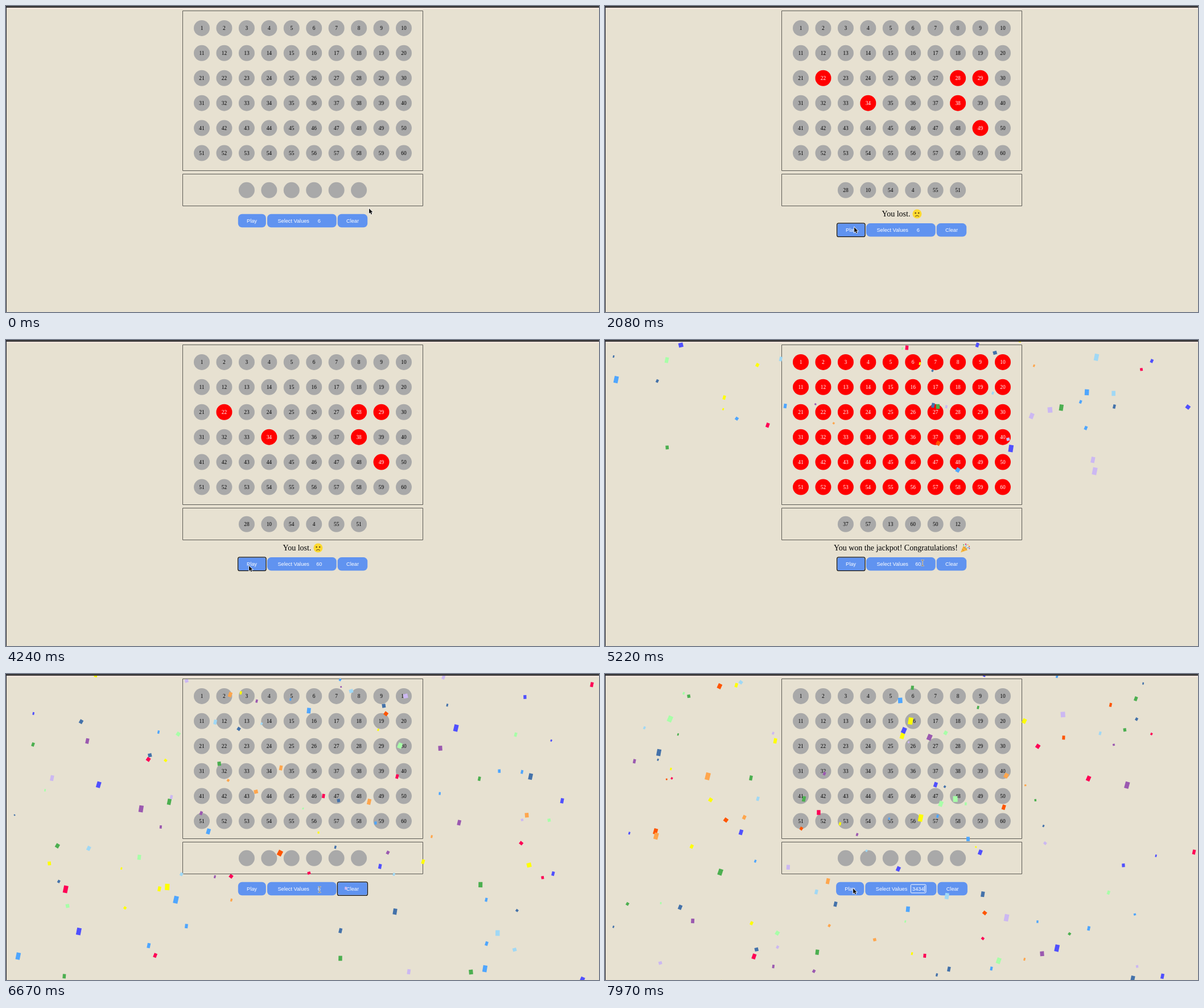
These frames come from a looping animation (1042 px wide and 538 px high, 8000 ms). An HTML page with a canvas:

```html
<!DOCTYPE html>
<html lang="en">
<head>
<meta charset="utf-8">
<title>Lottery</title>
<style>
  html, body { margin: 0; height: 100%; overflow: hidden; background: #e7e1d1; }
  canvas { display: block; }
</style>
</head>
<body>
<canvas id="stage" width="1042" height="538"></canvas>
<script>
const ctx = document.getElementById('stage').getContext('2d');
const LOOP = 8000, BLUE = '#6093f0';
const SERIF = '"Liberation Serif", serif', SANS = '"Liberation Sans", sans-serif';
const WON = 'You won the jackpot! Congratulations!';

let seed = 11;
const random = () => (seed = (seed * 16807) % 2147483647) / 2147483647;
const between = (low, high) => low + random() * (high - low);
const pickSix = () => Array.from({ length: 6 }, () => Math.floor(between(1, 61)));
const all = Array.from({ length: 60 }, (_, i) => i + 1);

// Each state adds to the ones before it.
const cleared = { drawn: [], picks: [], message: '', value: '6' };
const states = [
  { at: 0, focus: '', ...cleared },
  { at: 800, focus: 'Play' },
  { at: 860, drawn: pickSix(), picks: pickSix(), message: 'You lost.' },
  { at: 1960, drawn: [22, 28, 29, 34, 38, 49], picks: [28, 10, 54, 4, 55, 51] },
  { at: 2910, focus: 'input' },
  { at: 3740, value: '60' },
  { at: 4190, focus: 'Play' },
  { at: 4310, drawn: all, picks: [37, 57, 13, 60, 50, 12], message: WON },
  { at: 5540, focus: 'Clear' },
  { at: 5620, ...cleared },
  { at: 6960, focus: 'input' },
  ...[1, 2, 3, 4].map(n => ({ at: 7040 + n * 120, value: '3434'.slice(0, n) }))
];

// Pointer moves: from time, to time, x, y
const moves = [
  [60, 630, 430, 385], [780, 1700, 438, 389], [2260, 2560, 549, 392], [2910, 3080, 549, 409],
  [3700, 4160, 427, 397], [4420, 5220, 558, 392], [5340, 5520, 600, 381],
  [5640, 5780, 589, 393], [5800, 6400, 551, 379], [7560, 7900, 436, 377]
];

function pointerAt(t) {
  let x = 638, y = 356;
  for (const [from, to, endX, endY] of moves) {
    const u = Math.min(1, Math.max(0, (t - from) / (to - from))), ease = u * u * (3 - 2 * u);
    x += (endX - x) * ease;
    y += (endY - y) * ease;
  }
  return [x, y];
}

const palette = ['#4caf50', '#ff0055', '#ffa64d', '#ff5500', '#9b59b0', '#5050ff',
  '#4472aa', '#a0d8f5', '#a8ffa8', '#4fa6ff', '#ffff00', '#ccb8f2'];

// Nearer pieces are larger and fall faster.
const confetti = Array.from({ length: 190 }, (_, i) => {
  const depth = random();
  return {
    birth: 4330 + i * 19, x: between(5, 1040), speed: 0.15 + 0.165 * depth, size: 3.2 + 7 * depth,
    sway: between(-18, 18), phase: between(0, 6.3), spin: between(0.003, 0.008),
    lean: random() < 0.6 ? 1 : -1, color: palette[Math.floor(random() * palette.length)]
  };
});

function drawConfetti(t) {
  ctx.save();
  ctx.beginPath();
  ctx.rect(1, 3, 1041, 535);
  ctx.clip();
  for (const p of confetti) {
    const age = t - p.birth, y = p.speed * age - 8;
    if (age < 0 || y > 550) continue;
    const tumble = Math.abs(Math.sin(p.phase + p.spin * age));
    const w = p.size * 0.8, h = p.size * (0.7 + 0.6 * tumble);
    ctx.save();
    ctx.translate(p.x + p.sway * Math.sin(age / 575), y);
    ctx.rotate(0.2 + 0.5 * (1 - tumble) * p.lean);
    ctx.fillStyle = p.color;
    ctx.fillRect(-w / 2, -h / 2, w, h);
    ctx.restore();
  }
  ctx.restore();
}

function text(str, x, y, font, color, align = 'center') {
  ctx.font = font;
  ctx.fillStyle = color;
  ctx.textAlign = align;
  ctx.fillText(str, x, y);
}

function disc(x, y, r, color) {
  ctx.fillStyle = color;
  ctx.beginPath();
  ctx.arc(x, y, r, 0, 7);
  ctx.fill();
}

function line(shape, color, width) {
  ctx.strokeStyle = color;
  ctx.lineWidth = width;
  ctx.stroke(new Path2D(shape));
}

function box(x, y, w, h, r, stroke, width) {
  ctx.beginPath();
  ctx.roundRect(x, y, w, h, r);
  ctx.strokeStyle = stroke;
  ctx.lineWidth = width;
  ctx.stroke();
}

function ball(column, y, label, lit) {
  const x = 344 + 39.44 * column;
  disc(x, y, 14, lit ? '#ff0000' : '#a9a9a9');
  text(label, x, y + 3.2, '9.4px ' + SERIF, lit ? '#fff' : '#000');
}

function button(label, x, y, w, labelX, focused) {
  ctx.beginPath();
  ctx.roundRect(x, y, w, 23.4, 7);
  ctx.fillStyle = BLUE;
  ctx.fill();
  if (focused) {
    box(x + 0.6, y + 0.6, w - 1.2, 22.2, 3, '#fff', 0.8);
    ctx.fill();
    box(x - 0.2, y - 0.2, w + 0.4, 23.8, 3, '#101010', 1.3);
  }
  text(label, labelX, y + 14.8, '9.2px ' + SANS, '#fff');
}

function sadFace(x, y) {
  const brown = '#5a3d16';
  disc(x, y, 8, '#fdd92f');
  disc(x - 2.8, y - 1.5, 1.2, brown);
  disc(x + 2.8, y - 1.5, 1.2, brown);
  line(`M${x - 3} ${y + 4.5}q3 -3 6 0`, brown, 1.1);
}

function partyPopper(x, y) {
  ctx.fillStyle = '#f5b63a';
  ctx.fill(new Path2D(`M${x - 8} ${y + 8}l4.5 -11q6 1 7 7z`));
  line(`M${x - 5.5} ${y + 2}l3.5 3.5M${x - 3.5} ${y - 2.5}l6.5 6.5`, '#d9822b', 1);
  line(`M${x} ${y - 1}q3 -3 1 -6M${x + 2} ${y + 1}q3 -3 6 -1`, '#4f9bd8', 1);
  for (let i = 0; i < 5; i++)
    disc(x + 1 + 6.5 * Math.cos(i * 0.6 - 2.2), y + 6.5 * Math.sin(i * 0.6 - 2.2), 1, palette[i]);
}

function drawPointer(t, shift) {
  const [x, y] = pointerAt(t);
  if (Math.abs(x - 550.5) < 13 && Math.abs(y - 377.5 - shift) < 9) {
    const beam = `M${x - 2.5} ${y - 5}h5M${x} ${y - 5}v10M${x - 2.5} ${y + 5}h5`;
    line(beam, '#fff', 2.2);
    line(beam, '#333', 0.8);
  } else {
    const arrow = `M${x} ${y}v9l2.1 -1.9l1.5 3.3l1.6 -.7l-1.5 -3.2h2.8z`;
    line(arrow, '#fff', 1.4);
    ctx.fillStyle = '#111';
    ctx.fill(new Path2D(arrow));
  }
}

function drawBackground() {
  const bands = [['#e7e1d1', 0, 0, 1042, 538], ['#efe3d9', 0, 3, 1042, 3],
    ['#3c3a3b', 0, 0, 1042, 3], ['#20202a', 0, 0, 1, 538]];
  for (const [color, ...area] of bands) {
    ctx.fillStyle = color;
    ctx.fillRect(...area);
  }
  for (const [y, h] of [[8.5, 281], [295.5, 56]]) box(310.5, y, 422, h, 0, '#5c5a54', 1);
}

function draw(t) {
  const s = Object.assign({}, ...states.filter(state => state.at <= t));
  const shift = s.message ? 16.3 : 0, top = 365.8 + shift;
  const editing = s.focus === 'input', grow = editing ? 1.7 : 0;

  drawBackground();
  for (const n of all)
    ball((n - 1) % 10, 38.9 + 43.93 * Math.floor((n - 1) / 10), n, s.drawn.includes(n));
  for (let i = 0; i < 6; i++) ball(i + 2, 323.8, s.picks[i] ?? '', false);

  if (s.message) {
    const won = s.message === WON;
    text(s.message, won ? 402 : 486.5, 370, '14px ' + SERIF, '#000', 'left');
    won ? partyPopper(633, 365.5) : sadFace(548.4, 365.5);
  }

  button('Play', 407.8 - grow, top, 49, 432 - grow, s.focus === 'Play');
  button('Select Values', 459 - grow, top, 121.7 + 2 * grow, 505.2 - grow, false);
  button('Clear', 582.6 + grow, top, 52.6, 609 + grow, s.focus === 'Clear');
  text(s.value, 550.3, top + 14.8, '9.2px ' + SANS, '#fff');
  if (editing) {
    const caretX = Math.round(550.8 + ctx.measureText(s.value).width / 2);
    box(537.3, top + 4.3, 26.6, 14.8, 1.5, '#fff', 1);
    if ((t - s.at) % 1120 < 560) ctx.fillRect(caretX, top + 6.5, 1, 10.5);
  }

  drawConfetti(t);
  drawPointer(t, shift);
}

const start = performance.now();
function tick() {
  draw((performance.now() - start) % LOOP);
  requestAnimationFrame(tick);
}
tick();
</script>
</body>
</html>
```
